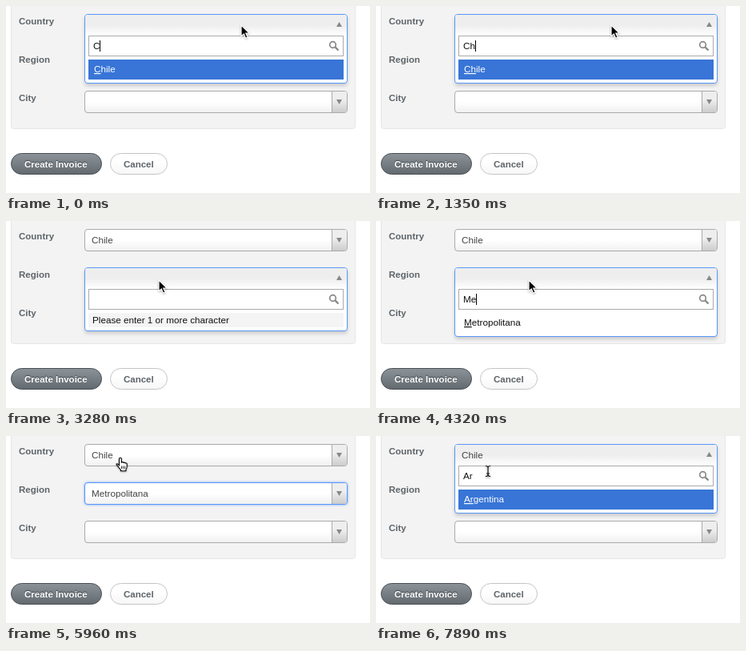
Recreate the animation shown at these times as an HTML page. Size 455x234 px, loop 8 s.

```html
<!DOCTYPE html>
<html lang="en">
<head>
<meta charset="utf-8">
<title>Dependent selects</title>
<style>
html, body { margin: 0; width: 100%; height: 100%; overflow: hidden; background: #fff; }
svg { display: block; width: 455px; height: 234px; }
text { font: 11.7px "Liberation Sans", Arial, sans-serif; fill: #444; white-space: pre; }
.label { font-size: 11.5px; font-weight: bold; fill: #5e6469; }
.ink { fill: #111; }
.light { fill: #fff; }
.hit { text-decoration: underline; }
.primary { fill: #fff; text-shadow: 0 -1px 1px #3a4046; }
.drop { filter: drop-shadow(0 3px 2px rgba(0, 0, 0, .16)); }
.glow { filter: drop-shadow(0 0 1.5px rgba(70, 135, 245, .75)); }
#cursor { filter: drop-shadow(0 1px 1px rgba(0, 0, 0, .3)); }
</style>
</head>
<body>
<svg viewBox="0 0 455 234">
  <defs>
    <linearGradient id="closed" x2="0" y2="1">
      <stop offset=".5" stop-color="#fff"/><stop offset="1" stop-color="#f0f0f0"/>
    </linearGradient>
    <linearGradient id="opened" x2="0" y2="1">
      <stop offset=".5" stop-color="#eee"/><stop offset="1" stop-color="#fff"/>
    </linearGradient>
    <linearGradient id="arrowBox" x2="0" y2="1">
      <stop offset=".4" stop-color="#eee"/><stop offset="1" stop-color="#ccc"/>
    </linearGradient>
    <linearGradient id="dark" x2="0" y2="1">
      <stop stop-color="#8c9399"/><stop offset="1" stop-color="#62696f"/>
    </linearGradient>
    <linearGradient id="pale" x2="0" y2="1">
      <stop offset=".4" stop-color="#fff"/><stop offset="1" stop-color="#f6f6f6"/>
    </linearGradient>
  </defs>
  <rect x="6.5" y="-8.5" width="430" height="162" rx="3" fill="#f3f3f3" stroke="#e6e6e6"/>
  <text class="label" x="16" y="23">Country</text>
  <text class="label" x="16" y="71">Region</text>
  <text class="label" x="16" y="119">City</text>
  <rect x="6.5" y="184.5" width="113" height="26" rx="13" fill="url(#dark)" stroke="#484e53"/>
  <text class="label primary" x="23" y="202">Create Invoice</text>
  <rect x="130.5" y="184.5" width="71" height="26" rx="13" fill="url(#pale)" stroke="#c4c4c4"/>
  <text class="label" x="147" y="202">Cancel</text>
  <g id="form"></g>
  <rect id="caret" width="1" height="14" fill="#000"/>
  <g id="cursor"></g>
</svg>
<script>
const LOOP = 8000, PITCH = 48;
const $ = id => document.getElementById(id);

// time, open field, focused field, typed text, option, matched letters, highlighted
const steps = [
  [0, 0, -1, 'C', 'Chile', 1, true],
  [150, 0, -1, 'Ch', 'Chile', 1, false],
  [300, 0, -1, 'Ch', 'Chile', 2, true],
  [1800, -1, 0],
  [2690, 1, -1, ''],
  [4020, 1, -1, 'M'],
  [4170, 1, -1, 'M', 'Metropolitana', 1, true],
  [4320, 1, -1, 'Me', 'Metropolitana', 1, false],
  [4470, 1, -1, 'Me', 'Metropolitana', 2, true],
  [5510, -1, 1],
  [6100, 0, -1, ''],
  [6840, 0, -1, 'A', 'Argentina', 1, true],
  [6990, 0, -1, 'Ar', 'Argentina', 1, false],
  [7140, 0, -1, 'Ar', 'Argentina', 2, true]
];

const caretOff = [[750, 1350], [3280, 3730], [4920, 5510], [6550, 6840], [7740, LOOP]];

// time, shape, hot spot
const moves = [
  [0, 'arrow', 294, 24],
  [1950, 'hand', 288, 27],
  [2100, 'hand', 262, 36],
  [2250, 'arrow', 228, 50],
  [2400, 'hand', 204, 64],
  [2540, 'hand', 192, 73],
  [2690, 'arrow', 192, 73],
  [3280, 'arrow', 191, 74],
  [4920, 'beam', 190, 96],
  [5070, 'hand', 185, 121],
  [5220, 'hand', 181, 135],
  [5660, 'hand', 172, 106],
  [5810, 'hand', 154, 62],
  [5960, 'hand', 142, 27],
  [6100, 'arrow', 142, 27],
  [7740, 'arrow', 141, 33],
  [7890, 'beam', 140, 44]
];

const shapes = {
  arrow: `<path d="M0 0V14L3.3 11 5.6 16.2 8.1 15.1 5.8 10H10.2Z"
    stroke="#fff" stroke-width="1.2"/>`,
  hand: `<g transform="translate(-4.5 0)" fill="#fff" stroke="#000" stroke-width="1.1">
    <path d="M4 1.7a1.4 1.4 0 0 1 2.8 0V6q1.3-1.1 2.4.4 1.4-.8 2.4.5 2-.5 2.1 1.4V11
      q0 2.2-1.3 4V16.8H6V15.4Q3.6 13 2.5 11 .3 8.7 .7 8 1.7 7 4 9.7Z"/>
    <path d="M7 10.5v3.5M9 10.5v3.5M11 10.5v3.5" stroke-width=".8"/></g>`,
  beam: ['#fff" stroke-width="2.6', '#000" stroke-width="1.2'].map(s =>
    `<path fill="none" stroke="${s}" d="M-3-6.5Q0-6.5 0-4.5 0-6.5 3-6.5M0-4.5V5
      M-3 6.5Q0 6.5 0 4.5 0 6.5 3 6.5M-2 3H2"/>`).join('')
};

const rect = (x, y, w, h, fill, more = '') =>
  `<rect x="${x}" y="${y}" width="${w}" height="${h}" fill="${fill}" ${more}/>`;
const text = (x, y, str, cls = '', id = '') =>
  `<text x="${x}" y="${y}" class="${cls}" id="${id}">${str}</text>`;

function select(i, value, focused) {
  const edge = focused ? '#5897fb' : '#aaa';
  return `<g transform="translate(0 ${i * PITCH})">
    ${rect(98.5, 10.5, 328, 27, 'url(#closed)', `rx="3.5" stroke="${edge}" ${focused ? 'class="glow"' : ''}`)}
    <path d="M407 11H423.5Q426 11 426 14V34Q426 37 423.5 37H407Z" fill="url(#arrowBox)"/>
    <path d="M407.5 11V37" stroke="#aaa"/>
    <path d="M413 21H420L416.5 27Z" fill="#888"/>
    ${text(107, 28, value)}</g>`;
}

function dropdown(i, value, typed, item, hits, lit) {
  const row = item
    ? (lit ? rect(103, 67, 319, 25, '#3875d7') : '') +
      text(110, 83, `<tspan class="hit">${item.slice(0, hits)}</tspan>${item.slice(hits)}`, lit ? 'light' : 'ink')
    : rect(103, 67, 319, 18, '#f4f4f4') + text(108, 80, 'Please enter 1 or more character', 'ink');
  return `<g transform="translate(0 ${i * PITCH})">
    ${rect(98.5, 10.5, 328, item ? 86 : 79, '#fff', 'rx="3.5" stroke="#5897fb" class="drop"')}
    ${rect(99, 11, 327, 26, 'url(#opened)', 'rx="3"')}
    <path d="M413 26H420L416.5 20Z" fill="#888"/>
    ${text(107, 28, value)}
    ${rect(103.5, 37.5, 318, 25, '#fff', 'stroke="#aaa"')}
    <g fill="none" stroke="#888"><circle cx="408.5" cy="48.5" r="3.8" stroke-width="1.7"/>
    <path d="M411.5 51.5L415.5 55.5" stroke-width="2.4"/></g>
    ${text(109, 54, typed, 'ink', 'typed')}${row}</g>`;
}

const current = (table, t) => table.findLast(row => row[0] <= t);
let shownStep, shownMove;

function drawForm(step) {
  const [t, open, focus, ...list] = step;
  const values = [t >= 1800 ? 'Chile' : '', t >= 5510 ? 'Metropolitana' : '', ''];
  $('form').innerHTML = values.map((v, i) => i === open ? '' : select(i, v, i === focus)).join('') +
    (open < 0 ? '' : dropdown(open, values[open], ...list));
  if (open < 0) return;
  $('caret').setAttribute('x', Math.round(109 + $('typed').getComputedTextLength()));
  $('caret').setAttribute('y', 43 + open * PITCH);
}

function draw(now) {
  const t = now % LOOP;
  const step = current(steps, t), move = current(moves, t);
  if (step !== shownStep) drawForm(shownStep = step);
  if (move !== shownMove) {
    const [, shape, x, y] = shownMove = move;
    $('cursor').innerHTML = shapes[shape];
    $('cursor').setAttribute('transform', `translate(${x} ${y})`);
  }
  const hidden = step[1] < 0 || caretOff.some(([a, b]) => t >= a && t < b);
  $('caret').setAttribute('visibility', hidden ? 'hidden' : 'visible');
}

const start = performance.now();
function tick(now) {
  draw(Math.max(0, now - start));
  requestAnimationFrame(tick);
}
draw(0);
requestAnimationFrame(tick);
</script>
</body>
</html>
```
